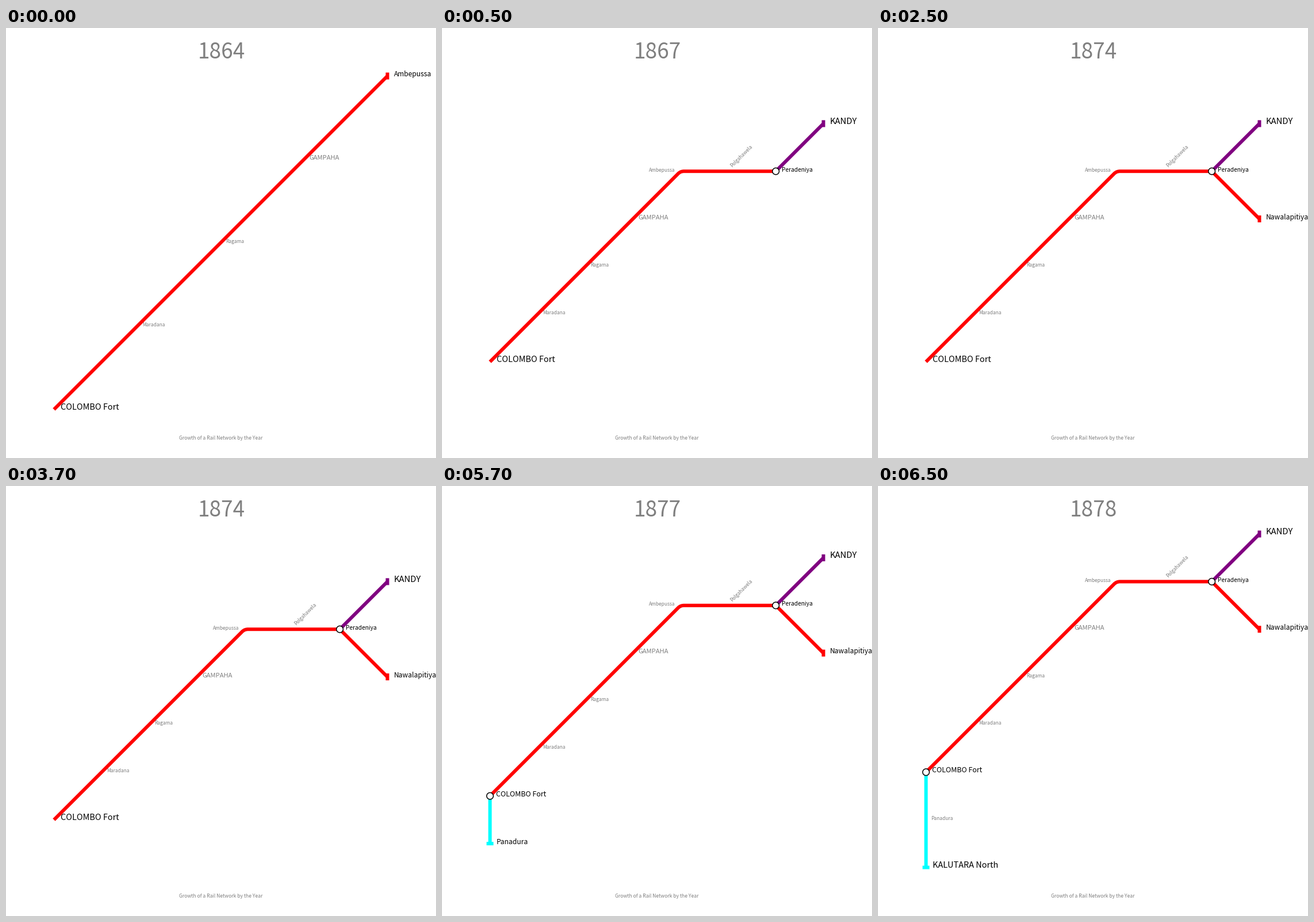
Animation of 748x748 px, one loop 8 s. Source, as a matplotlib script:

```python
import matplotlib.pyplot as plt
from matplotlib.animation import FuncAnimation
from matplotlib.patches import Circle, PathPatch, Rectangle
from matplotlib.path import Path

SIZE, DPI = 748, 68
PT = 72 / DPI                     # points per pixel
LEFT, SPAN, MIDDLE = 83.5, 580, 373.5
TRACK = 6
STEP_MS, LOOP_MS = 500, 8000
STAGES = [(0, 1864), (500, 1867), (2500, 1874), (4500, 1877), (6500, 1878)]

plt.rcParams["font.family"] = "Noto Sans CJK JP"
plt.rcParams["path.snap"] = False
fig = plt.figure(figsize=(SIZE / DPI, SIZE / DPI), dpi=DPI, facecolor="white")
ax = fig.add_axes([0, 0, 1, 1])


def label(x, y, text, px, color="black", ha="left", rotation=0):
    ax.text(x, y, text, fontsize=px * PT, color=color, ha=ha, va="baseline",
            rotation=rotation, rotation_mode="anchor", zorder=4)


def stop(point, text, px=8.4, dx=9):
    label(point[0] + dx, point[1] + 0.5, text, px, "gray",
          ha="left" if dx > 0 else "right")


def track(points, color, codes=None):
    ax.add_patch(PathPatch(Path(points, codes), fill=False, edgecolor=color,
                           linewidth=TRACK * PT, capstyle="butt",
                           joinstyle="round", zorder=1))


def end_label(point, text, px):
    label(point[0] + 11.3, point[1] + 0.5, text, px)


def terminus(point, text, px, color, upright=True):
    x, y = point
    w, h = (6, 12) if upright else (12, 6)
    ax.add_patch(Rectangle((x - w / 2, y - h / 2), w, h, facecolor=color,
                           linewidth=0, zorder=2))
    end_label(point, text, px)


def junction(point, text, px):
    ax.add_patch(Circle(point, 5.8, facecolor="white", edgecolor="black",
                        linewidth=1.5 * PT, zorder=3))
    label(point[0] + 10.3, point[1] + 0.5, text, px)


def draw_map(year):
    cols, rows = {1864: (4, 4), 1867: (7, 5), 1874: (7, 5),
                  1877: (7, 6), 1878: (7, 7)}[year]
    unit = SPAN / cols
    top = MIDDLE - rows * unit / 2

    def at(col, row):
        return LEFT + col * unit, top + row * unit

    base = 4 if year == 1864 else 5
    colombo = at(0, base)
    stop(at(1, base - 1), "Maradana")
    stop(at(2, base - 2), "Ragama")
    stop(at(3, base - 3), "GAMPAHA", 11.2)

    if year == 1864:
        track([colombo, at(4, 0)], "red")
        terminus(at(4, 0), "Ambepussa", 12, "red")
    else:
        bend, peradeniya, kandy = at(4, 1), at(6, 1), at(7, 0)
        x, y = bend
        track([colombo, (x - 4, y + 4), bend, (x + 6, y), peradeniya], "red",
              [Path.MOVETO, Path.LINETO, Path.CURVE3, Path.CURVE3, Path.LINETO])
        track([peradeniya, kandy], "purple")
        terminus(kandy, "KANDY", 14.8, "purple")
        stop(bend, "Ambepussa", dx=-9)
        x, y = at(5, 1)
        label(x + 6.5, y - 6.5, "Polgahawela", 8.4, "gray", rotation=45)
        junction(peradeniya, "Peradeniya", 10.2)
        if year >= 1874:
            track([peradeniya, at(7, 2)], "red")
            terminus(at(7, 2), "Nawalapitiya", 12, "red")

    if year < 1877:
        end_label(colombo, "COLOMBO Fort", 14.4)
        return
    end = at(0, rows)
    track([colombo, end], "cyan")
    junction(colombo, "COLOMBO Fort", 12.4)
    if year == 1877:
        terminus(end, "Panadura", 12, "cyan", upright=False)
    else:
        stop(at(0, 6), "Panadura")
        terminus(end, "KALUTARA North", 14.4, "cyan", upright=False)


def update(frame):
    now = frame * STEP_MS
    year = [y for start, y in STAGES if start <= now][-1]
    ax.clear()
    ax.set(xlim=(0, SIZE), ylim=(SIZE, 0))
    ax.axis("off")
    label(375, 52.5, str(year), 37, "gray", ha="center")
    label(374, 716.5, "Growth of a Rail Network by the Year", 8.6, "gray",
          ha="center")
    draw_map(year)
    return []


animation = FuncAnimation(fig, update, frames=LOOP_MS // STEP_MS,
                          interval=STEP_MS, repeat=True, repeat_delay=0)
plt.show()
```
